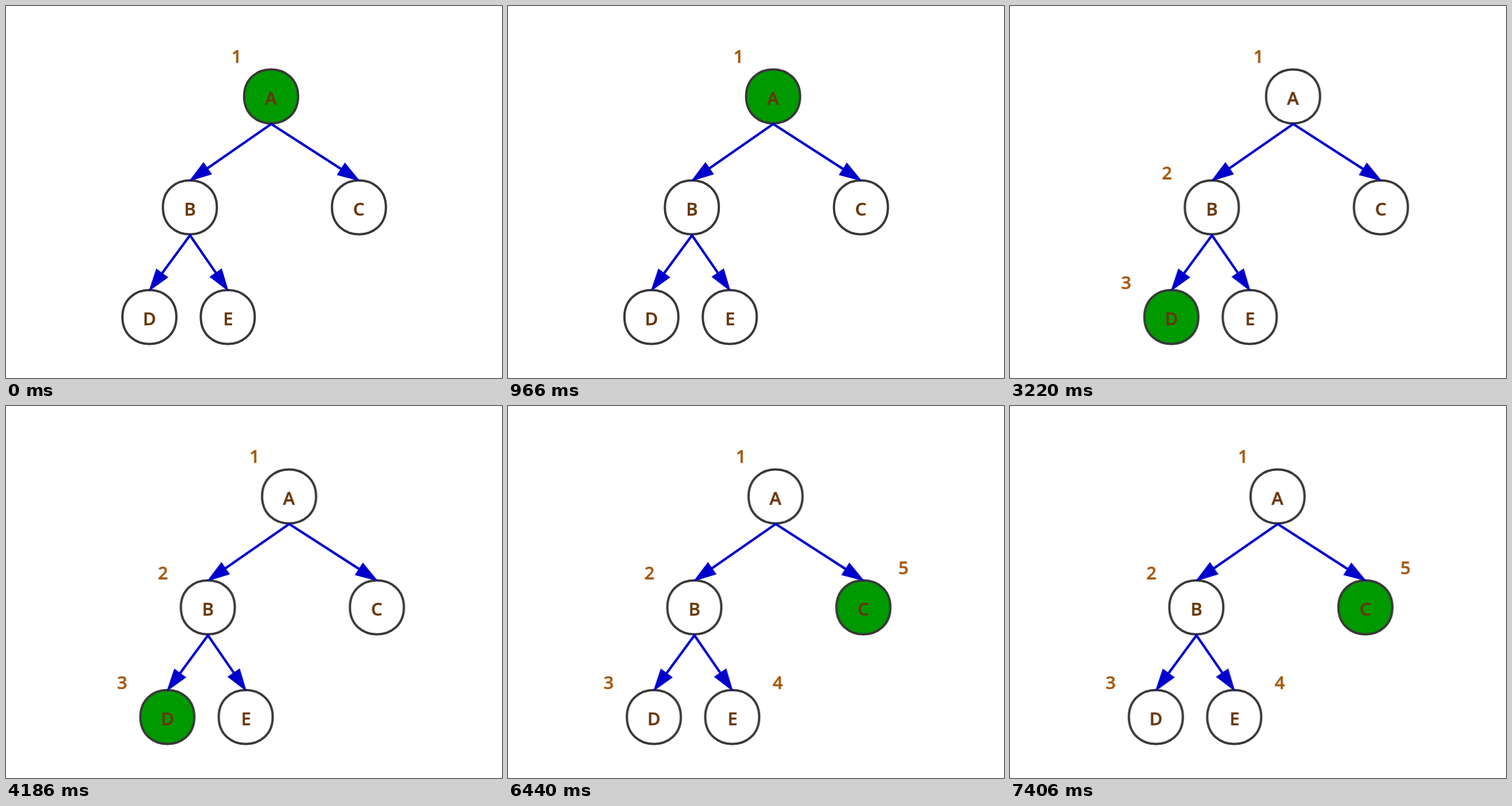
These frames come from a looping animation (864x648 px, 8.05 s). An HTML page:

```html
<!DOCTYPE html>
<html lang="en">
<head>
<meta charset="utf-8">
<title>Preorder traversal</title>
<style>
  html, body { margin: 0; width: 100%; height: 100%; overflow: hidden; background: #fff; }
  svg { display: block; width: 100vw; height: 100vh; }

  .tree, .node, .order text { animation: 8.05s step-end infinite; }
  .tree { animation-name: shift; }
  .node { fill: #fff; stroke: #383838; stroke-width: 4; animation-name: visit; animation-delay: calc((var(--n) - 6) * 1.61s); }
  .edge { fill: none; stroke: #00c; stroke-width: 4.3; }
  marker { overflow: visible; }

  text { font: 600 31px "Open Sans", "Noto Sans", sans-serif; text-anchor: middle; stroke-width: .5; }
  .name { fill: #683508; stroke: #683508; }
  .order { fill: #a5580e; stroke: #a5580e; }
  .order .second { animation-name: second; }
  .order .third { animation-name: third; }
  .order .fourth { animation-name: fourth; }
  .order .fifth { animation-name: fifth; }

  @keyframes shift {
    0% { transform: none; }
    40% { transform: translateX(31.3px); }
    80%, 100% { transform: translateX(4.3px); }
  }
  @keyframes visit {
    0% { fill: #090; }
    20%, 100% { fill: #fff; }
  }
  @keyframes second { 0% { opacity: 0; } 20%, 100% { opacity: 1; } }
  @keyframes third { 0% { opacity: 0; } 40%, 100% { opacity: 1; } }
  @keyframes fourth { 0% { opacity: 0; } 60%, 100% { opacity: 1; } }
  @keyframes fifth { 0% { opacity: 0; } 80%, 100% { opacity: 1; } }
</style>
</head>
<body>
<svg viewBox="0 0 864 648">
  <defs>
    <path id="ring" d="M-47 0C-47-62.7 47-62.7 47 0C47 62.7-47 62.7-47 0Z"/>
    <marker id="head" markerUnits="userSpaceOnUse" markerWidth="38" markerHeight="24" refX="4" refY="12" orient="auto-start-reverse">
      <path d="M1 0L38 12L1 24Z" fill="#00c" stroke="#00c" stroke-width="1.5"/>
    </marker>
  </defs>
  <g class="tree">
    <use class="node" style="--n:1" href="#ring" x="461.8" y="157.5"/>
    <use class="node" style="--n:2" href="#ring" x="320.3" y="350.8"/>
    <use class="node" style="--n:3" href="#ring" x="249.8" y="541.8"/>
    <use class="node" style="--n:4" href="#ring" x="386.3" y="541.8"/>
    <use class="node" style="--n:5" href="#ring" x="614.8" y="350.8"/>

    <g class="edge" marker-start="url(#head)" marker-end="url(#head)">
      <polyline points="348.4,284.6 462,205.5 586.4,285.6"/>
      <polyline points="270.1,468 320.5,399.5 367.3,467.4"/>
    </g>

    <g class="name">
      <text x="461.5" y="172">A</text>
      <text x="320.5" y="365">B</text>
      <text x="614.5" y="365">C</text>
      <text x="250" y="556">D</text>
      <text x="387" y="556">E</text>
    </g>
    <g class="order">
      <text x="401.5" y="99">1</text>
      <text class="second" x="242" y="302">2</text>
      <text class="third" x="171" y="493">3</text>
      <text class="fourth" x="465.5" y="493">4</text>
      <text class="fifth" x="684.5" y="293">5</text>
    </g>
  </g>
</svg>
</body>
</html>
```
